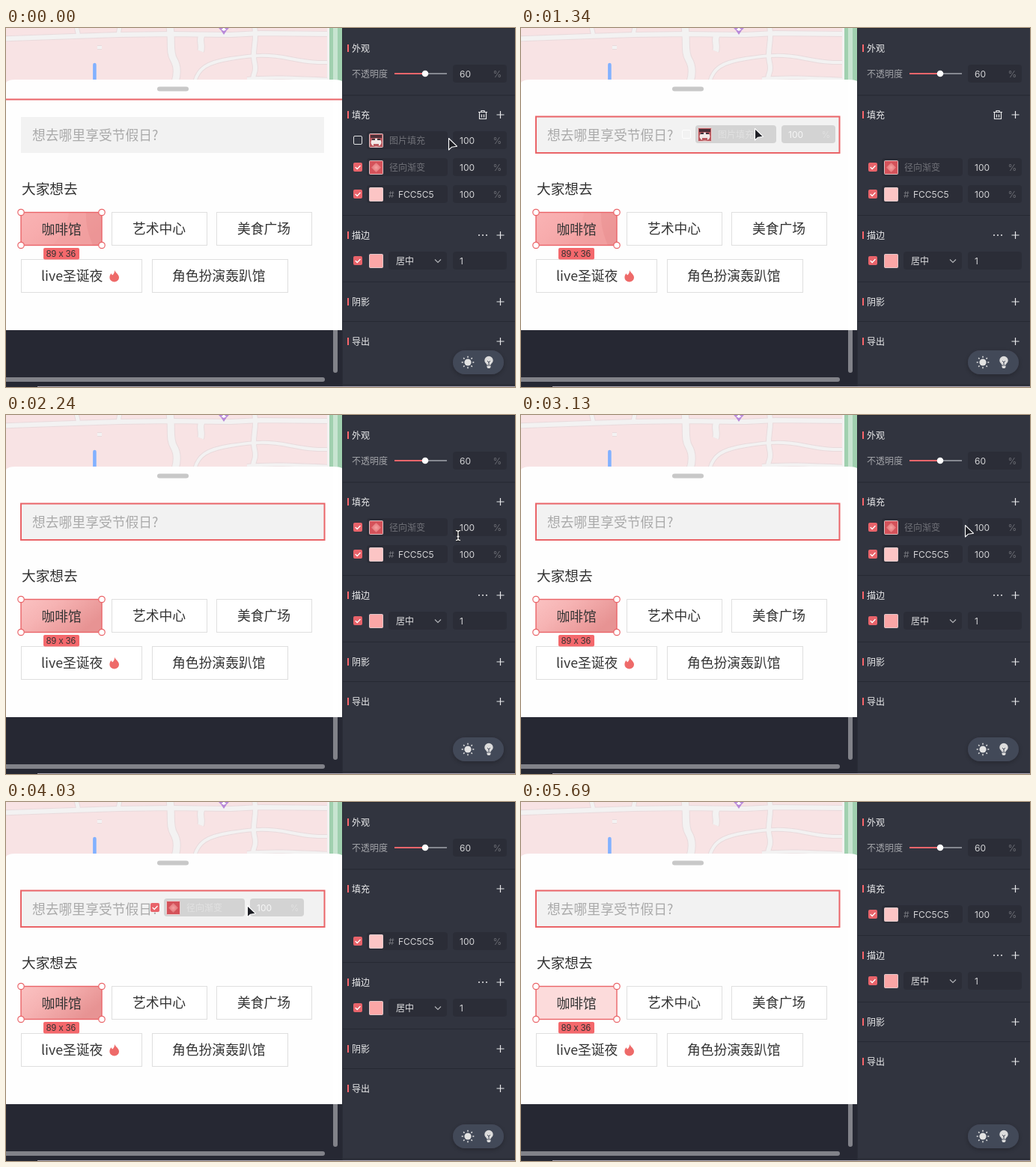
Animation, 680 px wide and 480 px high, one loop 5790 ms. Source, as an HTML page:

```html
<!DOCTYPE html>
<html lang="zh-CN">
<head>
<meta charset="utf-8">
<style>
  html, body { margin: 0; width: 100%; height: 100%; overflow: hidden; background: #262833; }
  svg { display: block; }
  text { font: 12px Inter, "Noto Sans CJK SC", "Noto Sans CJK", sans-serif; fill: #fff; white-space: pre; }
  .page text { font: 17.8px "Noto Sans CJK SC", "Noto Sans CJK", sans-serif; fill: #333; }
  .page .hint { fill: #aaa; }
  .page .head { font-size: 18.7px; }
  .size text { font: 12px "Liberation Sans", Arial, sans-serif; text-anchor: middle; }
  .line { fill: none; stroke: #e8e9eb; stroke-width: 1.2; }
  .road { fill: none; stroke: #f3f2f2; stroke-linejoin: round; }
  .edge { fill: none; stroke: #e9dadc; stroke-linejoin: round; }
  .focus { fill: none; stroke: #ea6468; stroke-width: 2; }
</style>
</head>
<body>
<svg id="stage" width="680" height="480" viewBox="0 0 680 480"></svg>
<script>
const LOOP = 5790;
const DROPS = [1640, 4180];
const GRABS = [{ t: 750, x: 561, y: 142 }, { t: 3430, x: 593, y: 147 }];

// Pointer positions [time, x, y], each held until the next
const PATH = [
  [0, 591, 147], [600, 581, 145], [750, 561, 142], [900, 541, 141], [1040, 485, 139],
  [1190, 395, 136], [1340, 312, 134], [1490, 299, 133], [1640, 297, 133],
  [1940, 420, 140], [2090, 556, 153], [2240, 604, 161], [2390, 616, 168], [2540, 620, 172],
  [2680, 616, 168], [2830, 609, 161], [2980, 602, 156], [3130, 593, 147],
  [3430, 570, 146], [3580, 510, 143], [3730, 441, 141], [3880, 378, 140],
  [4030, 322, 138], [4180, 357, 137]
];

const rect = (x, y, w, h, fill, more = '') =>
  `<rect x="${x}" y="${y}" width="${w}" height="${h}" fill="${fill}" ${more}/>`;
const text = (x, mid, s, alpha = 1, size = 12, cls = '') =>
  `<text x="${x}" y="${mid + size * .375}" fill-opacity="${alpha}" class="${cls}">${s}</text>`;
const group = (id, body, more = '') => `<g id="${id}" ${more}>${body}</g>`;
const path = (d, more) => `<path d="${d}" ${more}/>`;

// Panel parts
const field = (x, y, w) => rect(x, y - 12, w, 24, '#000', 'fill-opacity=".13" rx="4"');
const amount = (y, s, unit = '%') =>
  field(597, y, 72) + text(606, y, s, .8) + text(650.5, y, unit, .3);
const plus = y => path(`M655.5 ${y}h10m-5-5v10`, 'class="line"');
const title = (y, s) => rect(456, y - 5, 2, 10, '#f9666b') + text(462, y, s, .9);
const rule = y => rect(450, y, 230, 1, '#262933');
const checkbox = (y, on) => on
  ? rect(464, y - 6, 12, 12, '#e8636a', 'rx="2"') +
    path(`M466.7 ${y}l2.5 2.5 4.3-4.5`, 'fill="none" stroke="#fff" stroke-width="1.3"')
  : rect(464.5, y - 5.5, 11, 11, 'none', 'rx="1.5" stroke="#fff" stroke-opacity=".85"');
const swatch = (y, fill) =>
  rect(485.5, y - 8.5, 18, 18, fill, 'rx="1" stroke="#f5dede" stroke-opacity=".8"');

const thumb = rect(486, -8, 17, 17, '#b9585e') + rect(487, -7, 15, 4, '#4b3038') +
  '<ellipse cx="494.5" cy="3" rx="7" ry="5.5" fill="#f3e9e7"/>' +
  rect(489, -2, 4, 2, '#41343c') + rect(496, -2, 4, 2, '#41343c') + rect(491, 5, 7, 3, '#b9585e');

const rows = [
  checkbox(0, false) + field(482, 0, 108) + swatch(0, '#b9585e') + thumb + text(512, 0, '图片填充', .32),
  checkbox(0, true) + field(482, 0, 108) + swatch(0, '#d4525a') +
    path('M494.5-6l6.5 6.5-6.5 6.5-6.5-6.5z', 'fill="url(#spot)"') + text(512, 0, '径向渐变', .32),
  checkbox(0, true) + field(482, 0, 108) + swatch(0, '#fcc5c5') + text(511, 0, '#', .35) + text(524, 0, 'FCC5C5', .8)
].map((body, i) => group('row' + i, body + amount(0, '100')));

const trash = path('M631 112.5h12m-8 0v-2h4v2m-6.5 0v9h9v-9m-6 3v4m3-4v4', 'class="line"');
const sunRays = Array.from({ length: 8 }, (_, i) =>
  `<path d="M0-6.3v-2" transform="rotate(${i * 45})" stroke="#e3e3e3" stroke-width="1.5"/>`).join('');

const panel = rect(449, 0, 231, 480, '#31343f') + rect(449, 0, 1, 480, '#292c36') +
  [0, 89.5, 476.5].map(rule).join('') +
  title(27, '外观') + text(462, 61, '不透明度', .55) +
  rect(519, 60, 41, 2, '#f4666b') + rect(560, 60, 29, 2, '#858891') +
  '<circle cx="560" cy="61" r="4.3" fill="#fff"/>' + amount(61, '60') +
  title(116, '填充') + plus(116) + group('trash', trash) +
  group('lower',
    [250, 339, 392].map(rule).join('') + title(277, '描边') + plus(277) +
    [632, 637, 642].map(x => `<circle cx="${x}" cy="277" r="1" fill="#e8e9eb"/>`).join('') +
    checkbox(311, true) + swatch(311, '#fba6a6') + field(511, 311, 78) + text(521, 311, '居中', .85) +
    path('M573 309.5l4 4 4-4', 'class="line" stroke-opacity=".7"') + amount(311, '1', '') +
    title(366, '阴影') + plus(366) + title(419, '导出') + plus(419)) +
  rect(597, 431, 68, 32, '#434858', 'rx="16" filter="url(#soft)"') +
  `<g transform="translate(617 447)"><circle r="4.6" fill="#e3e3e3"/>${sunRays}</g>` +
  path('M642.3 450.5c0-2-3-3-3-6a5.7 5.7 0 0 1 11.4 0c0 3-3 4-3 6zM642.5 451.5h5v2l-1.2 1.5h-2.6l-1.2-1.5z', 'fill="#dcdcdc"') +
  path('M643 445l2 2 2-2m-2 2v3', 'fill="none" stroke="#434858"');

// Page parts
const roads = [
  ['M-5 14.5L90 11 150 9 222 8 300 9 340 7 432 8', 6],
  ['M94-2L97 11M152-2L150 9', 5],
  ['M219-2C222 20 218 32 224 42S229 62 226 72', 9],
  ['M332-2C336 18 328 30 332 46S328 60 331 70', 6],
  ['M262 9C257 16 263 23 260 31', 8],
  ['M252 72C257 54 268 46 300 41S350 35 380 41 420 46 434 46', 4],
  ['M322 68C356 65 390 67 434 69', 4],
  ['M122 26h6', 4]
];
const strokes = (cls, extra) =>
  roads.map(([d, w]) => path(d, `class="${cls}" stroke-width="${w + extra}"`)).join('');
const map = rect(0, 0, 449, 80, '#f8e3e4') + strokes('edge', 2) + strokes('road', 0) +
  rect(431, 0, 18, 80, '#a0d0af') + rect(429, 0, 3, 80, '#f3f2f2') +
  path('M118.4 49v24', 'stroke="#82b1ff" stroke-width="4.6" stroke-linecap="round"') +
  path('M283-1h16l-4 4-4 6-4-6z', 'fill="#b889d9"') + path('M291-3l1.5 4 2 1-3.5 2-3.5-2 2-1z', 'fill="#fff"');

const chip = (x, y, w, tx, s) =>
  rect(x + .5, y + .5, w, 44, '#fff', 'stroke="#dfdfdf"') + text(tx, y + 22.5, s, 1, 17.8);
const knobs = [[20, 246.5], [128, 246.5], [20, 290.5], [128, 290.5]].map(([x, y]) =>
  `<circle cx="${x}" cy="${y}" r="4.2" fill="#fff" stroke="#ea6468" stroke-width="1.2"/>`).join('');
const coffee = rect(20, 246.5, 108, 44, '#fcdbdb') +
  group('shade', rect(20, 246.5, 108, 44, 'url(#blush)')) +
  group('photo', rect(20, 246.5, 108, 44, '#f9a6a8', 'fill-opacity=".5"') +
    path('M62 290.5C74 278 82 264 84 246.5H107C106 264 111 278 116 290.5z', 'fill="#f2a0a0" fill-opacity=".55"') +
    path('M107 246.5h21v44h-12C111 278 106 264 107 246.5z', 'fill="#e98f90" fill-opacity=".5"')) +
  text(47.5, 269, '咖啡馆', 1, 17.8) +
  rect(20, 246.5, 108, 44, 'none', 'stroke="#ea6468" stroke-width="1.4"') + knobs +
  `<g class="size">${rect(50, 294, 48, 15.5, '#f4686c', 'rx="2"')}${text(73.5, 301.8, '89 x 36', 1, 12)}</g>`;

const page = map +
  path('M0 404V73Q3 69 12 69H437Q446 69 449 71V404z', 'fill="#fefefe"') +
  rect(202, 78.5, 42, 6, '#c8c8c8', 'rx="3"') + rect(20, 119, 405, 48, '#f2f2f2') +
  text(35, 143, '想去哪里享受节假日?', 1, 17.8, 'hint') + text(21, 215, '大家想去', 1, 18.7, 'head') +
  chip(141, 246, 127, 169, '艺术中心') + chip(281, 246, 127, 309, '美食广场') +
  chip(20, 309, 161, 47, 'live圣诞夜') + chip(195, 309, 181, 222, '角色扮演轰趴馆') +
  path('M145 323.5c1 4 6 5.5 6 10.2a6.2 5.6 0 0 1-12.6 0c0-2.8 1.2-4.4 2.2-5.4l1.4 2.2c2.2-1.4 3.2-4 3-7z', 'fill="#ee6a69"') +
  coffee + rect(437, -9, 6, 470, '#fff', 'rx="3" fill-opacity=".42"') +
  rect(-9, 467, 435, 6, '#fff', 'rx="3" fill-opacity=".42"') +
  '<path id="top" class="focus" d="M0 95.5H449"/>' +
  '<path id="search" class="focus" d="M20 118.5H425.5V167H20z"/>' +
  '<path id="sheet" class="focus" d="M1 68.5H448V405H1z"/>';

const beam = 'M-3-6.5Q0-6.5 0-4.5Q0-6.5 3-6.5M0-5V5M-3 6.5Q0 6.5 0 4.5Q0 6.5 3 6.5M-1.5 1.5h3';
const pointers =
  group('arrow', path('M.5 .5V16L4.6 12.2 11.5 11.2z', 'fill="#1d1e24" stroke="#fff" stroke-width="1.1" stroke-linejoin="round"')) +
  group('beam', path(beam, 'fill="none" stroke="#111" stroke-width="3"') +
    path(beam, 'fill="none" stroke="#fff" stroke-width="1.3"'));

const defs = `<defs>
  <radialGradient id="spot"><stop stop-color="#f5a0a0"/><stop offset="1" stop-color="#e07377"/></radialGradient>
  <linearGradient id="blush" x2="1" y2=".5"><stop stop-color="#fbc2c2"/><stop offset=".4" stop-color="#f6b3b3"/><stop offset="1" stop-color="#e79393"/></linearGradient>
  <filter id="soft" x="-20%" y="-30%" width="140%" height="160%"><feDropShadow dx="0" dy="2" stdDeviation="3" flood-opacity=".25"/></filter>
</defs>`;

const $ = id => document.getElementById(id);
$('stage').innerHTML = defs + rect(0, 0, 680, 480, '#262833') + `<g class="page">${page}</g>` +
  panel + rect(42, 479, 638, 1, '#b3acb8') + rows.reverse().join('') + pointers;

const show = (id, on) => $(id).style.display = on ? '' : 'none';
const move = (id, x, y) => $(id).setAttribute('transform', `translate(${x} ${y})`);

function draw(t) {
  const removed = DROPS.filter(d => t >= d).length;
  const [, x, y] = PATH.findLast(p => t >= p[0]);
  const grab = GRABS[removed];

  for (let i = 0; i < 3; i++) {
    const held = i === removed && grab && t >= grab.t;
    show('row' + i, i >= removed);
    move('row' + i, held ? x - grab.x : 0, 150 + 36 * (i - removed) + (held ? y - grab.y : 0));
  }
  move('lower', 0, -36 * removed);
  show('trash', removed === 0);
  show('photo', removed === 0);
  show('shade', t < 4780);

  const onSheet = t >= 3730 && t < 3880;
  show('top', t < 1190);
  show('sheet', onSheet);
  show('search', t >= 1190 && !onSheet);

  const typing = x > 597;
  show('arrow', !typing && t < 4930);
  show('beam', typing);
  move('arrow', x, y);
  move('beam', x, y);
}

const start = performance.now();
function tick() {
  draw((performance.now() - start) % LOOP);
  requestAnimationFrame(tick);
}
tick();
</script>
</body>
</html>
```
